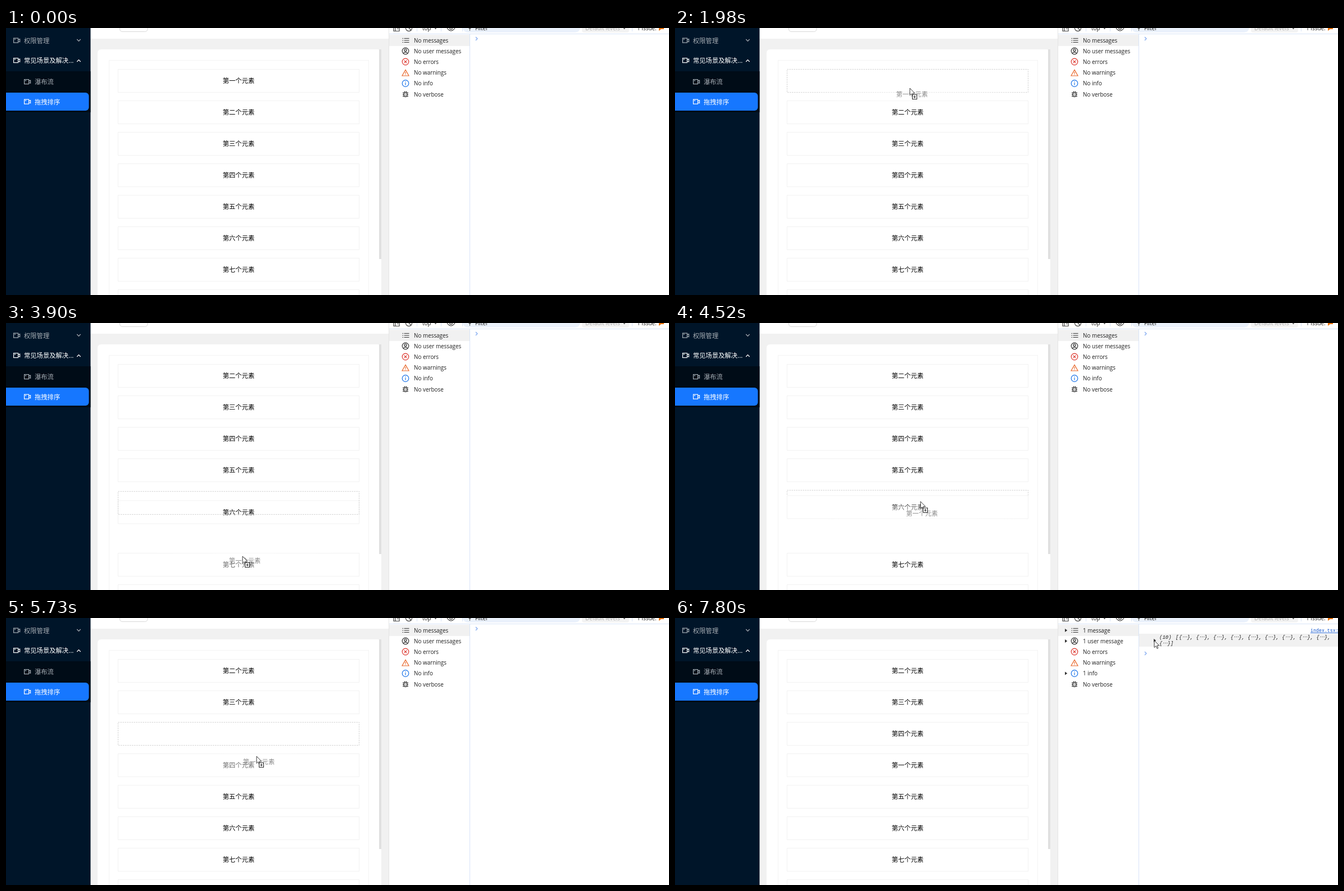
Write an HTML page that moves like this. It is 1180 px wide and 475 px high and loops after 8000 ms.

```html
<!DOCTYPE html>
<html lang="zh-CN">
<head>
<meta charset="utf-8">
<title>拖拽排序</title>
<style>
  html, body { margin: 0; width: 100%; height: 100%; overflow: hidden; background: #fff; }
  svg { display: block; width: 1180px; height: 475px; }
  text { white-space: pre; }
  .cn { font: 11.3px "Noto Sans CJK SC", "Noto Sans CJK", sans-serif; }
  .ui { font: 9.9px "Open Sans", "Noto Sans", sans-serif; fill: #1f1f1f; }
  .mono { font: 9px "Liberation Mono", "Noto Sans Mono", monospace; }
  .wide { font-family: "Noto Sans CJK SC", "Noto Sans CJK", sans-serif; }
  #output { font-style: italic; fill: #222; }
  #link { font-size: 8.3px; fill: #1155cc; text-decoration: underline; }
  .mid { text-anchor: middle; }
  .line { fill: none; stroke-width: 1.2; }
</style>
</head>
<body>
<svg viewBox="0 0 1180 475">
  <defs>
    <radialGradient id="fade">
      <stop offset="0" stop-color="#fff" stop-opacity=".5"/>
      <stop offset=".5" stop-color="#fff" stop-opacity=".4"/>
      <stop offset="1" stop-color="#fff" stop-opacity="0"/>
    </radialGradient>
    <g id="camera" class="line"><rect x=".6" y=".6" width="8" height="8"/><path d="M8.6 3.4l3-1.2v5l-3-1.2M2 2.6h2"/></g>
    <path id="arrow" d="M0 0V12.5L2.9 9.8 5 14.4l1.9-.9-2.1-4.5H8.8z" fill="#fff" stroke="#222" stroke-width=".9"/>
    <path id="caret" d="M0-3l4.2 3-4.2 3z" fill="#333"/>
    <path id="arm" d="M-1-1V-4.2H-2.6L0-6.8 2.6-4.2H1V-1"/>
  </defs>

  <!-- page -->
  <rect width="682" height="475" fill="#f1f1f1"/>
  <rect x="150" width="531" height="19" fill="#fff"/>
  <rect x="202.5" y="-18" width="49.5" height="24.5" rx="4.5" fill="#fff" stroke="#d9d9d9"/>
  <rect x="163" y="38" width="505" height="450" rx="6" fill="#fff"/>
  <rect x="664" y="38" width="4" height="373" fill="#e0e0e0"/>
  <rect x="183.5" y="57.5" width="462" height="450" fill="none" stroke="#f3f3f3"/>
  <g id="list"></g>

  <!-- navigation -->
  <rect width="150.5" height="475" fill="#001529"/>
  <rect y="77" width="150.5" height="73" fill="#000c17"/>
  <rect x="-10" y="115" width="157.5" height="32" rx="6" fill="#1677ff"/>
  <g class="cn" fill="#a6adb4">
    <text x="32" y="26.5">权限管理</text>
    <text x="32" y="62" fill="#fff">常见场景及解决...</text>
    <text x="51" y="100">瀑布流</text>
    <text x="51" y="135.5" fill="#fff">拖拽排序</text>
  </g>
  <use href="#camera" x="13" y="17.5" stroke="#a6adb4"/>
  <use href="#camera" x="13" y="53" stroke="#fff"/>
  <use href="#camera" x="32" y="91" stroke="#a6adb4"/>
  <use href="#camera" x="32" y="126.5" stroke="#fff"/>
  <path class="line" d="M126.3 20l3.2 3.4 3.2-3.4" stroke="#a6adb4"/>
  <path class="line" d="M126.3 60l3.2-3.4 3.2 3.4" stroke="#fff"/>

  <!-- developer tools -->
  <rect x="681" width="499" height="475" fill="#fff"/>
  <path d="M681.5 0V475" stroke="#e4e4e4"/>
  <path d="M682 10.5H1180M825.5 10V475" stroke="#d8e4f8"/>
  <g class="line" stroke="#444">
    <path d="M690-4V5.5H700V-4M693 0V5M696 1.5h2.5"/>
    <circle cx="717" cy="0" r="5.6"/><path d="M713-4l8 8"/>
    <path d="M785 0q7 10 14 0"/><circle cx="792" cy="0" r="2.4"/>
  </g>
  <path d="M731.5 0V6M774.5 0V6M812.5 0V6M1114.5 0V6" stroke="#d8e4f8"/>
  <rect x="813" y="-10" width="209" height="18" rx="9" fill="#eaf1fb"/>
  <rect x="1025" y="-10" width="84" height="18" rx="4" fill="#f3f3f3"/>
  <path d="M823 0h5l-2 2v3h-1V2zM762-1h5l-2.5 3.5zM1098-1h5l-2.5 3.5z" fill="#555"/>
  <g class="ui">
    <text x="741" y="4">top</text>
    <text x="835" y="4">Filter</text>
    <text x="1031" y="4" style="fill:#aaa">Default levels</text>
    <text x="1123" y="4">1 Issue:</text>
  </g>
  <path d="M1162 0h9v2h-5l-4 3z" fill="#e8710a"/>

  <rect x="682" y="12" width="143" height="20" fill="#f1f1f1"/>
  <g class="line" stroke="#333">
    <path d="M705.5 18.5h1.5m1.5 0h9M705.5 22h1.5m1.5 0h9M705.5 25.5h1.5m1.5 0h9"/>
    <circle cx="711" cy="41" r="5.8"/><circle cx="711" cy="39.4" r="2"/><path d="M707 45q4-3.6 8 0"/>
    <g stroke="#dc362e"><circle cx="711" cy="60" r="5.8"/><path d="M708.6 57.6l4.8 4.8m0-4.8l-4.8 4.8"/></g>
    <path stroke="#e8672a" d="M711 74.4l6 10.6h-12zM711 78v3.4M711 82.4v1.2"/>
    <g stroke="#1a73e8"><circle cx="711" cy="98.5" r="5.8"/><path d="M711 97.6v4M711 95v1.3"/></g>
    <rect x="708.4" y="114.4" width="5.2" height="8" rx="2.4"/>
    <path d="M706 115.4h2.4m5.2 0h2.4M706 118.4h2.4m5.2 0h2.4M706 121.4h2.4m5.2 0h2.4M709 112.4l1 2m3-2l-1 2M710 117h2m-2 3h2"/>
  </g>
  <g id="labels" class="ui"></g>

  <g id="log">
    <use href="#caret" x="694" y="22"/>
    <use href="#caret" x="694" y="41"/>
    <use href="#caret" x="694" y="98.5"/>
    <rect x="826" y="28" width="354" height="23" fill="#f1f1f1"/>
    <use href="#caret" x="852" y="40"/>
    <text id="link" class="mono" x="1131" y="25">index.tsx:25</text>
    <g id="output" class="mono"></g>
  </g>
  <path id="prompt" class="line" d="M836-3l3 3-3 3" stroke="#7da7f0"/>

  <g id="ghost">
    <rect x="-215" y="-21" width="430" height="42" fill="url(#fade)"/>
    <text class="cn mid" y="4.3" fill-opacity=".45">第一个元素</text>
  </g>
  <g id="pointer"><use href="#arrow"/></g>
  <g id="dragPointer">
    <use href="#arrow"/>
    <rect x="4.5" y="11.5" width="8" height="8" fill="#fff" stroke="#222"/>
    <path d="M8.5 13.3v4.4M6.3 15.5h4.4" stroke="#222"/>
  </g>
  <g id="movePointer" fill="#fff" stroke="#222" stroke-width=".9">
    <use href="#arm"/>
    <use href="#arm" transform="rotate(90)"/>
    <use href="#arm" transform="rotate(180)"/>
    <use href="#arm" transform="rotate(270)"/>
  </g>
</svg>
<script>
const LOOP = 8000, APPEAR = 290, DRAG = 1760, DROP = 6350, LOGGED = 6410, SLIDE = 300;
const TOP = 73, STEP = 56, LEFT = 199, WIDTH = 430, HEIGHT = 42;
const $ = id => document.getElementById(id);

function add(parent, tag, attrs, content = '') {
  const node = document.createElementNS('http://www.w3.org/2000/svg', tag);
  for (const key in attrs) node.setAttribute(key, attrs[key]);
  node.textContent = content;
  return parent.appendChild(node);
}

// Linear interpolation through keys of [time, ...values]
function at(keys, t) {
  const next = keys.findIndex(key => key[0] > t);
  if (next === 0) return keys[0].slice(1);
  if (next < 0) return keys[keys.length - 1].slice(1);
  const a = keys[next - 1], b = keys[next], k = (t - a[0]) / (b[0] - a[0]);
  return a.slice(1).map((v, i) => v + (b[i + 1] - v) * k);
}

// Pointer stops: arrival time, x, y, rest
const path = [
  [APPEAR, 787, 436], [1030, 442, 109], [1570, 411, 84, 190], [2390, 431, 150, 300],
  [2840, 433, 195], [3500, 425, 260, 70], [3900, 421, 415, 520], [4520, 437, 318],
  [4850, 443, 165, 420], [5730, 446, 246], [5970, 445, 258, 700],
  [7230, 887, 60], [7380, 853, 48], [7800, 853, 40]
].flatMap(([t, x, y, rest = 0]) => [[t, x, y], [t + rest, x, y]]);

const names = [...'一二三四五六七八'];
const order = names.map((_, i) => i);
const tracks = order.map(slot => [[0, slot]]);

// A card finishes one slide before it starts the next
function slide(card, time, from, to, duration) {
  const keys = tracks[card], start = Math.max(time, keys[keys.length - 1][0]);
  keys.push([start, from], [start + duration, to]);
}

// The dragged card trades places with a neighbour; it slides down but jumps up
const down = time => ({ time, dir: 1 }), up = time => ({ time, dir: -1 });
const swaps = [
  ...[2090, 2790, 3190, 3590, 3700].map(down),
  ...[4470, 4570, 4680, 4850].map(up),
  ...[5380, 5735].map(down)
];
for (const { time, dir } of swaps) {
  const from = order.indexOf(0), to = from + dir, other = order[to];
  slide(other, time, to, from, SLIDE);
  slide(0, time, from, to, dir > 0 ? SLIDE : 0);
  order[from] = other;
  order[to] = 0;
}

const list = $('list');
const cards = names.map(name => {
  const group = add(list, 'g', {});
  const box = add(group, 'rect', { x: LEFT + .5, y: .5, width: WIDTH - 1, height: HEIGHT - 1, fill: '#fff', stroke: '#f2f2f2' });
  const label = add(group, 'text', { class: 'cn mid', x: 414, y: 25.3 }, `第${name}个元素`);
  return { group, box, label };
});

const before = ['No messages', 'No user messages', 'No errors', 'No warnings', 'No info', 'No verbose'];
const after = { 0: '1 message', 1: '1 user message', 4: '1 info' };
const labels = before.map((s, i) => add($('labels'), 'text', { x: 726, y: 25.6 + i * 19.2 }, s));

// Console output, with full-width ellipses
function braces(x, y, tail) {
  const text = add($('output'), 'text', { x, y });
  add(text, 'tspan', {}, '{');
  add(text, 'tspan', { class: 'wide' }, '…');
  add(text, 'tspan', {}, '}' + tail);
}
add($('output'), 'text', { x: 862, y: 37 }, '(10)');
add($('output'), 'text', { x: 891, y: 37 }, '[');
for (let i = 0; i < 9; i++) braces(897 + i * 30.55, 37, ',');
braces(862, 48, ']');

function show(node, on) { node.style.display = on ? '' : 'none'; }
function place(node, x, y) { node.setAttribute('transform', `translate(${x.toFixed(2)} ${y.toFixed(2)})`); }

function drawCards(t, dragging) {
  cards.forEach(({ group }, i) => place(group, 0, TOP + STEP * at(tracks[i], t)[0]));

  // Cards lower in the list paint over those above
  const { group, box, label } = cards[0];
  const last = swaps.filter(swap => swap.time <= t).pop();
  if (last && last.dir > 0) {
    if (list.lastChild !== group) list.append(group);
  } else if (list.firstChild !== group) list.prepend(group);

  box.setAttribute('fill', dragging ? 'none' : '#fff');
  box.setAttribute('stroke', dragging ? '#d0d0d0' : '#f2f2f2');
  box.setAttribute('stroke-dasharray', dragging ? '2.4 1.6' : 'none');
  show(label, !dragging);
}

function drawPointer(t, dragging) {
  const [x, y] = at(path, t);
  const overCard = x > LEFT && x < LEFT + WIDTH && y > TOP && (y - TOP) % STEP < HEIGHT;
  const kind = dragging ? 'dragPointer' : overCard ? 'movePointer' : 'pointer';
  for (const id of ['dragPointer', 'movePointer', 'pointer']) {
    show($(id), t >= APPEAR && id === kind);
    place($(id), x, y);
  }

  // The drag image trails the pointer slightly
  const [gx, gy] = at(path, t - 10);
  show($('ghost'), dragging);
  place($('ghost'), gx + 4, gy + 11.5);
}

function drawConsole(logged) {
  show($('log'), logged);
  place($('prompt'), 0, logged ? 63 : 19);
  labels.forEach((node, i) => {
    const s = logged && after[i] || before[i];
    if (node.textContent !== s) node.textContent = s;
  });
}

function frame() {
  const t = performance.now() % LOOP, dragging = t >= DRAG && t < DROP;
  drawCards(t, dragging);
  drawPointer(t, dragging);
  drawConsole(t >= LOGGED);
  requestAnimationFrame(frame);
}
frame();
</script>
</body>
</html>
```
